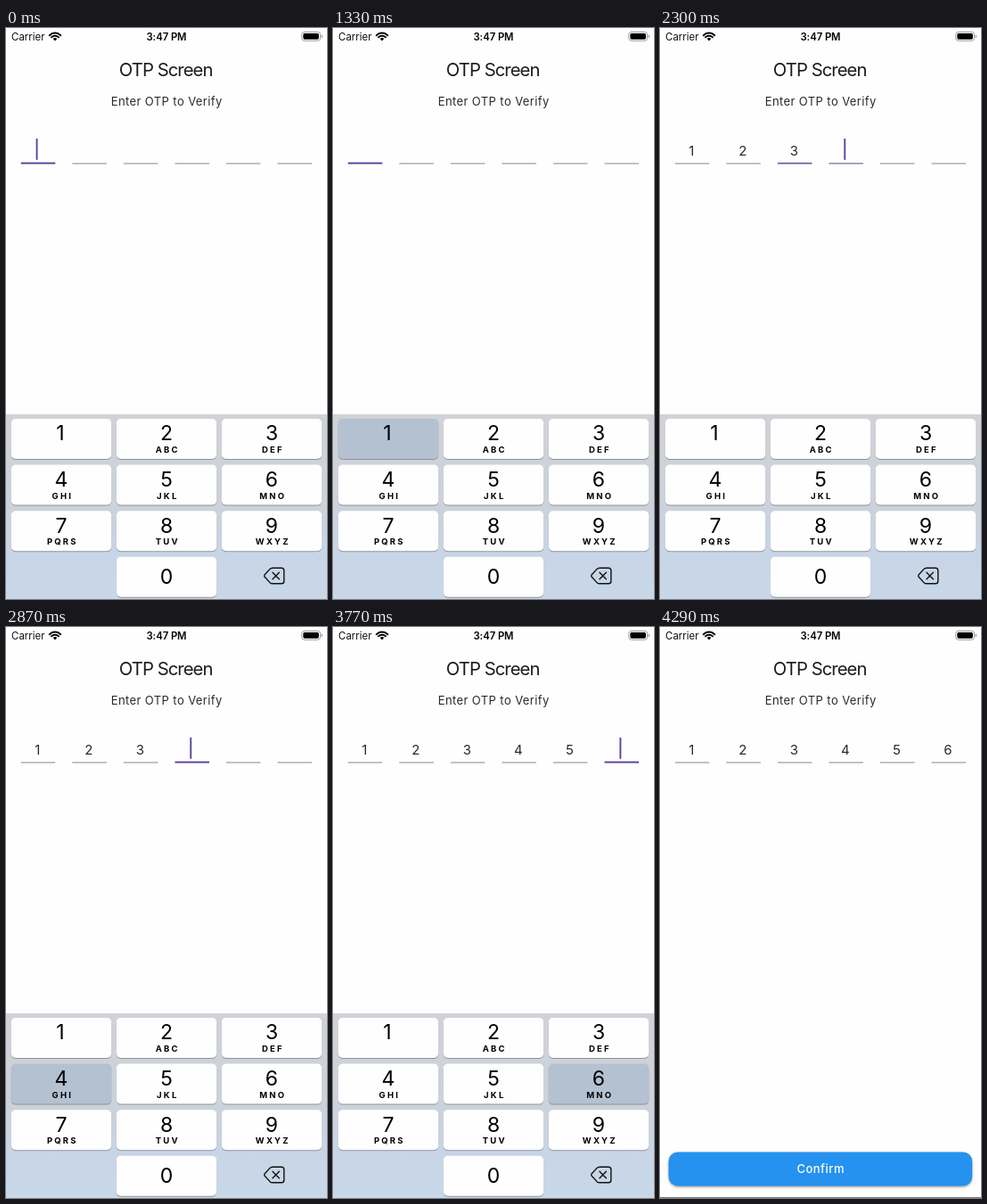
An HTML page with a canvas for the animation above (5.39 s loop, 360 by 640 pixels).

```html
<!DOCTYPE html>
<html lang="en">
<head>
<meta charset="utf-8">
<title>OTP Screen</title>
<style>
html, body { margin: 0; width: 100%; height: 100%; overflow: hidden; background: #fefefe; }
canvas { display: block; width: 360px; height: 640px; }
</style>
</head>
<body>
<canvas id="stage"></canvas>
<script>
const W = 360, H = 640, LOOP = 5390;
const canvas = document.getElementById('stage');
const ctx = canvas.getContext('2d');
const dpr = window.devicePixelRatio || 1;
canvas.width = W * dpr;
canvas.height = H * dpr;

const FONT = 'Inter, Roboto, sans-serif';
const PURPLE = [93, 66, 160], GREY = [158, 146, 166];
const KB_TOP = 433, KB_H = H - KB_TOP;

// The picture only changes at these moments, as in a low-rate screen recording.
const STEPS = [0, 110, 230, 460, 580, 1120, 1230, 1330, 1440, 1550, 1770, 1870, 1980,
  2090, 2200, 2300, 2410, 2520, 2870, 2980, 3090, 3330, 3440, 3560, 3770, 3870,
  3970, 4080, 4180, 4290];
const PRESS = [1330, 1770, 2200, 2870, 3330, 3770];
const TYPED = [1440, 1870, 2300, 2980, 3440, 3870];
const BLINK = [[0, 1], [20, 1], [230, 0], [390, 0], [580, 1], [1040, 1], [1230, 0], [1439, 0], [1440, 1]];
const LETTERS = ['', 'ABC', 'DEF', 'GHI', 'JKL', 'MNO', 'PQRS', 'TUV', 'WXYZ'];

const clamp = v => Math.max(0, Math.min(1, v));
const mix = (a, b, k) => a + (b - a) * k;

function track(keys, t) {
  for (let i = 1; i < keys.length; i++) {
    const [t0, a] = keys[i - 1], [t1, b] = keys[i];
    if (t < t1) return mix(a, b, (t - t0) / (t1 - t0));
  }
  return keys[keys.length - 1][1];
}

function text(str, x, y, size, { weight = 400, color = '#000', spacing = 0, align = 'center' } = {}) {
  ctx.font = `${weight} ${size}px ${FONT}`;
  ctx.letterSpacing = spacing + 'px';
  ctx.textAlign = align;
  ctx.fillStyle = color;
  ctx.fillText(str, align === 'center' ? x + spacing / 2 : x, y);
}

function box(x, y, w, h, r, fill) {
  ctx.beginPath();
  ctx.roundRect(x, y, w, h, r);
  ctx.fillStyle = fill;
  ctx.fill();
}

function wifi(x, y) {
  const a = Math.PI * 0.25;
  ctx.strokeStyle = ctx.fillStyle = '#000';
  ctx.lineWidth = 2;
  for (const r of [8.8, 5.7]) {
    ctx.beginPath();
    ctx.arc(x, y, r, -Math.PI / 2 - a, -Math.PI / 2 + a);
    ctx.stroke();
  }
  ctx.beginPath();
  ctx.moveTo(x, y);
  ctx.arc(x, y, 3.3, -Math.PI / 2 - a, -Math.PI / 2 + a);
  ctx.fill();
}

function battery() {
  ctx.beginPath();
  ctx.roundRect(331.7, 4.5, 20.8, 9.8, 2.8);
  ctx.strokeStyle = '#9b9b9b';
  ctx.lineWidth = 1;
  ctx.stroke();
  box(333.3, 6.1, 17.6, 6.6, 1.6, '#000');
  box(353.7, 7.7, 1.2, 3.4, 0.6, '#9b9b9b');
}

function header() {
  text('Carrier', 6, 14, 11.5, { align: 'left', color: '#111' });
  wifi(55, 14.4);
  text('3:47 PM', 180, 14, 11.3, { weight: 600, spacing: -0.05 });
  battery();
  text('OTP Screen', 179.6, 54, 20.3, { spacing: -0.95, color: '#1d1b20' });
  text('Enter OTP to Verify', 180, 87.4, 13, { spacing: 0.4, color: '#2a282d' });
}

// Share of focus that has moved on from field i to the next one.
const passed = (i, t) => t < TYPED[i] ? 0 : clamp((t - TYPED[i] + 45) / 150);

function fields(t) {
  const count = TYPED.filter(at => t >= at).length;
  for (let i = 0; i < 6; i++) {
    const x = 16.8 + i * 57.55, mid = x + 18.3;
    const focus = (i ? passed(i - 1, t) : 1) - passed(i, t);
    const thick = mix(1.15, 1.95, focus);
    ctx.fillStyle = `rgb(${GREY.map((g, n) => Math.round(mix(g, PURPLE[n], focus)))})`;
    ctx.fillRect(x, 152.5 - thick, 38.5, thick);
    if (i < count) text(String(i + 1), mid + 0.1, 142.6, 15, { color: '#2b292e' });
    if (i === count) {
      ctx.globalAlpha = track(BLINK, t);
      box(mid - 1.45, 123.7, 1.9, 24.2, 0.9, `rgb(${PURPLE})`);
      ctx.globalAlpha = 1;
    }
  }
}

function confirmButton() {
  ctx.save();
  ctx.shadowColor = 'rgba(0,0,0,0.35)';
  ctx.shadowBlur = 2.5 * dpr;
  ctx.shadowOffsetY = 1.3 * dpr;
  box(9.6, 588.4, 340.6, 38.2, 10.5, '#2492ee');
  ctx.restore();
  text('Confirm', 180, 612.2, 13, { weight: 500, spacing: 0.5, color: '#fff' });
  ctx.fillStyle = '#77777a';
  ctx.fillRect(0, 639, W, 1);
}

function key(n, x, y, down) {
  box(x, y + 1, 112.4, 45, 5, '#8f9298');
  box(x, y, 112.4, 45, 5, down ? '#b4c1d1' : '#fefefe');
  const mid = x + 56.2;
  text(String(n), n === 1 ? mid - 1 : mid, y + (n ? 24.3 : 30.2), 23);
  if (n) text(LETTERS[n - 1], mid + 0.2, y + 38.2, 9.5, { weight: 700, spacing: 2.2 });
}

function deleteIcon(x, y) {
  ctx.strokeStyle = '#111';
  ctx.lineWidth = 1.4;
  ctx.lineCap = ctx.lineJoin = 'round';
  ctx.beginPath();
  ctx.moveTo(x - 10.4, y - 1);
  ctx.lineTo(x - 4.6, y - 7.4);
  ctx.quadraticCurveTo(x - 3.2, y - 8.8, x - 1.4, y - 8.8);
  ctx.arcTo(x + 11.4, y - 8.8, x + 11.4, y, 2.8);
  ctx.arcTo(x + 11.4, y + 8.8, x, y + 8.8, 2.8);
  ctx.lineTo(x - 1.4, y + 8.8);
  ctx.quadraticCurveTo(x - 3.2, y + 8.8, x - 4.6, y + 7.4);
  ctx.lineTo(x - 10.4, y + 1);
  ctx.quadraticCurveTo(x - 11.2, y, x - 10.4, y - 1);
  ctx.moveTo(x - 1.4, y - 3.7);
  ctx.lineTo(x + 6, y + 3.7);
  ctx.moveTo(x + 6, y - 3.7);
  ctx.lineTo(x - 1.4, y + 3.7);
  ctx.stroke();
}

function keyboard(t) {
  const s = Math.max(0, t - TYPED[5]) * 0.026;
  const dy = KB_H * (1 - (1 + s) * Math.exp(-s));
  if (KB_H - dy < 0.2) return;
  // The tint stays in place: it is the blue button showing through the panel.
  const tint = ctx.createLinearGradient(0, KB_TOP, 0, H);
  [[0, '#d0d2d7'], [0.5, '#ccd2db'], [0.75, '#c7d5e6'], [1, '#c9d8e8']]
    .forEach(([at, color]) => tint.addColorStop(at, color));
  ctx.fillStyle = tint;
  ctx.fillRect(0, KB_TOP + dy, W, KB_H);
  const down = PRESS.findIndex((at, i) => t >= at && t < TYPED[i]) + 1;
  for (let n = 1; n <= 9; n++) {
    const col = (n - 1) % 3, row = Math.floor((n - 1) / 3);
    key(n, 5.8 + col * 118, 438 + row * 51.6 + dy, n === down);
  }
  key(0, 123.8, 592.8 + dy, false);
  deleteIcon(300.4, 614 + dy);
}

function draw(t) {
  ctx.setTransform(dpr, 0, 0, dpr, 0, 0);
  ctx.fillStyle = '#fefefe';
  ctx.fillRect(0, 0, W, H);
  header();
  fields(t);
  confirmButton();
  keyboard(t);
}

const start = performance.now();
function tick() {
  const t = (performance.now() - start) % LOOP;
  draw(STEPS.filter(s => s <= t).pop());
  requestAnimationFrame(tick);
}
tick();
</script>
</body>
</html>
```
